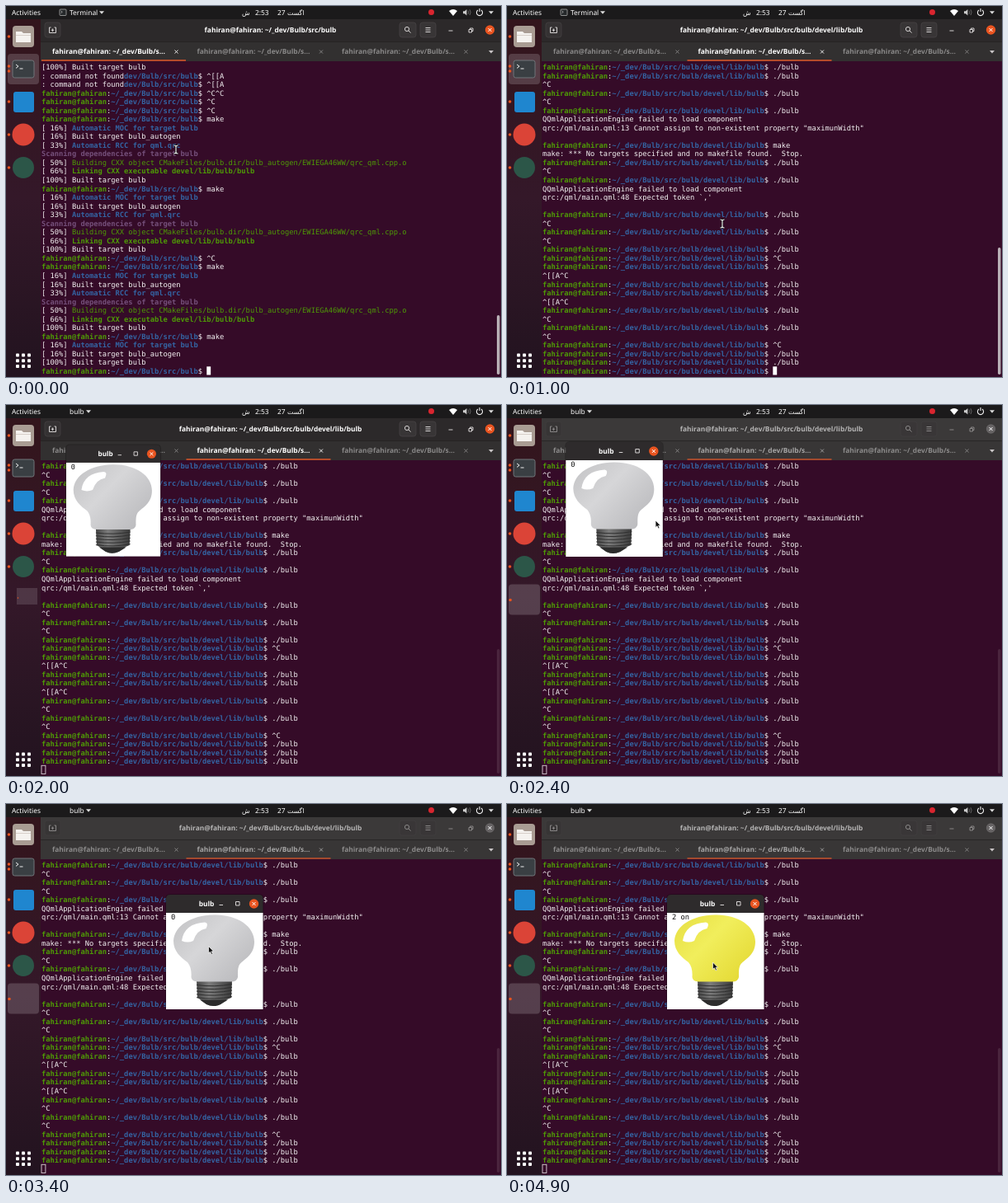
An HTML page for the animation above (5000 ms loop, 600 by 450 pixels).

```html
<!DOCTYPE html>
<html lang="en">
<head>
<meta charset="utf-8">
<title>Bulb demo</title>
<style>
html, body { margin: 0; width: 100%; height: 100%; overflow: hidden; background: #000; }
svg { display: block; width: 100vw; height: 100vh; }
text { white-space: pre; text-rendering: geometricPrecision; font-family: 'Noto Sans', 'Open Sans', sans-serif; font-size: 8.4px; fill: #fff; }
.mono, .mono text { font-family: 'DejaVu Sans Mono', monospace; font-size: 8.754px; }
.arabic { font-family: 'DejaVu Sans', sans-serif; font-size: 7.8px; }
.bold { font-weight: 700; }
.mid { text-anchor: middle; }
.w { fill: #f4f2f3; }
.g, .b, .m, .l { font-weight: 700; }
.g, .n, .l { fill: #4e9a06; }
.b { fill: #3465a4; }
.m { fill: #75507b; }
.line { fill: none; stroke: #d5d2d2; stroke-width: 1; }
</style>
</head>
<body>
<svg id="stage" viewBox="0 0 600 450">
  <defs>
    <linearGradient id="dock" x1="0" y1="0" x2="0" y2="1">
      <stop offset="0" stop-color="#33151c"/>
      <stop offset=".5" stop-color="#341829"/>
      <stop offset="1" stop-color="#22131f"/>
    </linearGradient>
    <linearGradient id="off" x1="0" y1="0" x2="1" y2=".8">
      <stop offset="0" stop-color="#c2c2c4"/>
      <stop offset=".45" stop-color="#d6d6d8"/>
      <stop offset="1" stop-color="#bababd"/>
    </linearGradient>
    <linearGradient id="on" x1="0" y1="0" x2="1" y2=".8">
      <stop offset="0" stop-color="#e6de42"/>
      <stop offset=".45" stop-color="#f1ee5c"/>
      <stop offset="1" stop-color="#e4d934"/>
    </linearGradient>
    <linearGradient id="metal">
      <stop offset="0" stop-color="#454545"/>
      <stop offset=".35" stop-color="#7c7c7c"/>
      <stop offset="1" stop-color="#3a3a3a"/>
    </linearGradient>
    <clipPath id="view"><rect x="42" y="69" width="558" height="381"/></clipPath>
  </defs>

  <!-- terminal window -->
  <rect x="42" y="67" width="558" height="383" fill="#350b28"/>
  <rect id="head" x="42" y="16" width="558" height="27"/>
  <rect id="strip" x="42" y="43" width="558" height="24"/>
  <path d="M42 43.5H600" stroke="#1e1b1c" stroke-opacity=".6"/>
  <g id="chrome">
    <rect x="47" y="20" width="19" height="18" rx="3" fill="#353233" stroke="#454142" stroke-width=".8"/>
    <path class="line" d="M52.5 26v6.5h8V26h-2M52.5 26h2M56.5 27.5v3.5M54.8 29.2h3.4"/>
    <rect x="477" y="20" width="20" height="18" rx="3" fill="#383536" stroke="#474344" stroke-width=".8"/>
    <circle class="line" cx="486" cy="28" r="2.6"/><path class="line" d="M488 30l2.6 2.6"/>
    <rect x="502" y="20" width="19" height="18" rx="3" fill="#383536" stroke="#474344" stroke-width=".8"/>
    <path class="line" d="M508.5 26.5h6M508.5 29h6M508.5 31.5h6"/>
    <path class="line" d="M536.5 30h5M561 28.5h3.5V32H561zM562.5 28.5V27H566v3.5h-1.5"/>
  </g>
  <text id="title" class="bold mid" x="320.5" y="32"></text>
  <circle id="close" cx="586.5" cy="29" r="5.7"/>
  <path d="M584.5 27l4 4m0-4l-4 4" stroke="#fff" stroke-width="1"/>
  <g id="tabs"></g>
  <rect id="underline" y="65.2" width="175" height="1.5" fill="#e0552a"/>
  <path d="M585 54h6l-3 3.5z" fill="#c9c5c6"/>
  <g clip-path="url(#view)">
    <g id="screen0" class="mono"></g>
    <g id="screen1" class="mono"></g>
  </g>
  <rect id="caret" width="4.9" height="10.2"/>
  <rect id="thumb" x="595" width="3.5" rx="1.7"/>

  <!-- dock -->
  <rect y="16" width="42" height="434" fill="url(#dock)"/>
  <rect id="active" x="2" width="38" height="37" rx="4" fill="#fff" fill-opacity=".17"/>
  <rect id="appBox" x="13" y="222" width="25" height="20" fill="#fff" fill-opacity=".13"/>
  <rect x="8" y="24" width="26" height="26" rx="4" fill="#a99c93"/>
  <path d="M12 31h7l2 2h9v11H12z" fill="#f5f2ef"/>
  <path d="M12 35.5h18" stroke="#d6cec8"/>
  <rect x="8" y="66" width="26" height="21" rx="2.5" fill="#3a3f43" stroke="#70767a"/>
  <path d="M12 71l3 2.2-3 2.2M16.5 76h4" fill="none" stroke="#eee"/>
  <rect x="9" y="104" width="25" height="25" rx="3" fill="#1f86cf"/>
  <circle cx="21" cy="156" r="13.5" fill="#db4437"/>
  <circle cx="21" cy="196" r="13" fill="#2c5648"/>
  <g id="dots" fill="#e95420"></g>
  <g id="grid" fill="#fff"></g>

  <!-- top bar -->
  <rect width="600" height="16" fill="#1b1a1b"/>
  <text x="7" y="11">Activities</text>
  <g id="appIcon">
    <rect x="65" y="4" width="8" height="7.5" rx="1" fill="#25282a" stroke="#aaa" stroke-width=".8"/>
    <path d="M66.7 6l1.5 1.3-1.5 1.3" fill="none" stroke="#ddd" stroke-width=".7"/>
  </g>
  <text id="appName" x="77" y="11"></text>
  <path id="appArrow" d="M-3 6.2h6L0 9.8z" fill="#ddd"/>
  <text x="286" y="11" class="arabic">ش</text>
  <text x="302" y="11">2:53</text>
  <text x="329" y="11">27</text>
  <text x="341" y="11" class="arabic">اگست</text>
  <circle cx="515.5" cy="7.5" r="3.5" fill="#d9252f"/>
  <path d="M537 6q5-4 10 0L542 12z" fill="#fff"/>
  <path d="M554 6.2h2l2.4-2.2v7.4L556 9.2h-2z" fill="#ccc"/>
  <path d="M560 5.5q1.5 2.2 0 4.4M562 4.3q2.2 3.4 0 6.8" fill="none" stroke="#777" stroke-width=".8"/>
  <path d="M572 5a3.6 3.6 0 1 0 4 0M574 3v4" fill="none" stroke="#eee" stroke-width="1.1"/>
  <path d="M585 6.2h6L588 9.8z" fill="#ddd"/>

  <!-- bulb window, drawn from its top left corner -->
  <g id="win">
    <path d="M-1 139V5q0-6 6-6h107.5q6 0 6 6v134z" fill="#000" fill-opacity=".25"/>
    <path d="M0 22V5q0-5 5-5h107.5q5 0 5 5v17z" fill="#2e2b2c"/>
    <rect y="22" width="117.5" height="117" fill="#fff"/>
    <text class="bold mid" x="49" y="14">bulb</text>
    <path class="line" d="M64.5 12.5h4.5M84.5 8.5h4.5v4.5h-4.5z"/>
    <circle cx="106.5" cy="11" r="5.7" fill="#e95420"/>
    <path d="M104.5 9l4 4m0-4l-4 4" stroke="#fff"/>
    <path d="M37 104H80L79 125L74 127L66 133Q57 137 49 133L43 128L38 125Z" fill="url(#metal)"/>
    <path d="M41 127.5h34l-9 5.500q-9 4-17 0z" fill="#2c2c2c"/>
    <g id="screw" fill="none" stroke="#2f2f2f"></g>
    <path id="glass" d="M58 24.5C86 24 107 38 107 57C107 73 95 78 89.5 84C86.5 88 87 95 87 100Q86 105.5 79 105.5H38Q31 105 30.5 100C31 93 30 87 26 82C18 76 9 69 9 56C10 38 30 25 58 24.5Z"/>
    <path d="M19 56Q22 35 47 33.5Q52 34 48.5 41Q37 43 33 56Q26 59 19 56Z" fill="#fff"/>
    <text id="count" class="mono" x="6" y="30" style="fill:#111"></text>
  </g>

  <!-- pointers, each around its hot spot -->
  <g id="beam" fill="none">
    <path d="M-2.5-5q2 0 2.5 1.2q.5-1.2 2.5-1.2M0-4V4M-2.5 5q2 0 2.5-1.2q.5 1.2 2.5 1.2" stroke="#111" stroke-width="2.4"/>
    <path d="M-2.5-5q2 0 2.5 1.2q.5-1.2 2.5-1.2M0-4V4M-2.5 5q2 0 2.5-1.2q.5 1.2 2.5 1.2" stroke="#fff" stroke-width="1.1"/>
  </g>
  <path id="arrow" d="M0 0V8.5L2 6.8L3.5 10L5 9.3L3.6 6.3H6.2Z" fill="#111" stroke="#fff" stroke-width=".7"/>
  <path id="hand" d="M-3.5-1q0-1.5 1.3-1.2V-4q1-1 1.6 0q1-1.3 1.8 0q1-.9 1.6.3q1.3-.5 1.3 1V2L3 4.5H-1.5L-3.5 1.5Z" fill="#fff" stroke="#111" stroke-width=".7"/>
</svg>

<script>
const LOOP = 5000, STEP = 100, ROW = 10.54, COL = 5.27, LEFT = 43, BASE = 77;
const USER = 'fahiran@fahiran', SRC = '~/_dev/Bulb/src/bulb', LIB = SRC + '/devel/lib/bulb';
const $ = id => document.getElementById(id);
const set = (node, attrs) => { for (const k in attrs) node.setAttribute(k, attrs[k]); };
const show = (node, on) => node.setAttribute('display', on ? 'inline' : 'none');
const move = (node, x, y, s = 1) => node.setAttribute('transform', `translate(${x} ${y}) scale(${s})`);
const clamp = v => Math.max(0, Math.min(1, v));
const mix = (a, b, p) => a + (b - a) * p;
const ease = p => p * p * (3 - 2 * p);

function add(parent, tag, attrs, text) {
  const node = document.createElementNS('http://www.w3.org/2000/svg', tag);
  set(node, attrs);
  if (text) node.textContent = text;
  return parent.appendChild(node);
}

// A line of output is a list of [class, text] runs.
const prompt = (path, cmd) => [['g', USER], ['w', ':'], ['b', path], ['w', '$ ' + cmd]];
const step = (pct, cls, text) => [['w', `[${String(pct).padStart(3)}%] `], [cls, text]];
const cd = cmd => prompt(SRC, cmd);
const lost = [['w', ': command not found'], ['b', 'dev/Bulb/src/bulb'], ['w', '$ ^[[A']];
const done = step(100, 'w', 'Built target bulb');
const moc = [step(16, 'b', 'Automatic MOC for target bulb'), step(16, 'w', 'Built target bulb_autogen')];
const build = [cd('make'), ...moc,
  step(33, 'b', 'Automatic RCC for qml.qrc'),
  [['m', 'Scanning dependencies of target bulb']],
  step(50, 'n', 'Building CXX object CMakeFiles/bulb.dir/bulb_autogen/EWIEGA46WW/qrc_qml.cpp.o'),
  step(66, 'l', 'Linking CXX executable devel/lib/bulb/bulb'), done];
const buildLog = [done, lost, lost, cd('^C^C'), cd('^C'), cd('^C'),
  ...build, ...build, cd('^C'), ...build, cd('make'), ...moc, done, cd('')];

const failed = 'QQmlApplicationEngine failed to load component';
const runLog = ['>', '>', '^C', '>', '^C', '>', failed,
  'qrc:/qml/main.qml:13 Cannot assign to non-existent property "maximunWidth"', '',
  '>make', 'make: *** No targets specified and no makefile found.  Stop.', '>', '^C', '>', failed,
  "qrc:/qml/main.qml:48 Expected token `,'", '', '>', '^C', '>', '^C', '>', '>^C', '>', '^[[A^C',
  '>', '>', '^[[A^C', '>', '^C', '>', '^C', '>^C', '>', '>', '> ']
  .map(s => s[0] === '>' ? prompt(LIB, s === '> ' ? '' : s.slice(1) || './bulb') : [['w', s]]);

function printLog(group, log) {
  return log.map((runs, i) => {
    const row = add(group, 'text', { x: LEFT, y: BASE + i * ROW });
    runs.forEach(([cls, text]) => add(row, 'tspan', { class: cls }, text));
    return row;
  });
}
printLog($('screen0'), buildLog);
const lastRow = printLog($('screen1'), runLog).pop();

const tabs = [56, 231.5, 407].map(x => {
  const tab = add($('tabs'), 'g', {});
  add(tab, 'text', { x, y: 58, class: 'bold' }, USER + ': ~/_dev/Bulb/s…');
  add(tab, 'path', { d: `M${x + 148.5} 53.5l4 4m0-4l-4 4`, stroke: '#fff', 'stroke-width': .9 });
  return tab;
});
[37, 73, 79, 116, 156, 196].forEach(cy => add($('dots'), 'circle', { cx: 3.5, cy, r: 1.8 }));
const appDot = add($('dots'), 'circle', {});
for (let i = 0; i < 9; i++)
  add($('grid'), 'rect', { x: 12 + i % 3 * 7, y: 421.5 + Math.floor(i / 3) * 6.8, width: 4, height: 4, rx: 1 });
for (let i = 0; i < 5; i++)
  add($('screw'), 'path', { d: `M37 ${109.5 + i * 3.8}q22 3 43-1` });

// Pointer stops: time, x, y, shape used until the next stop.
const stops = [
  [0, 206, 174, 'beam'], [200, 245, 110, 'beam'], [400, 285, 55, 'arrow'], [600, 283, 58, 'arrow'],
  [700, 275, 110, 'beam'], [1000, 261, 264, 'beam'], [1300, 261, 264, ''], [2200, 261, 264, 'beam'],
  [2400, 180, 140, 'arrow'], [2700, 110, 57, 'arrow'], [2900, 107, 57, 'hand'], [3300, 230, 122, 'arrow'],
  [3400, 245.5, 172.5, 'arrow'], [4000, 249, 192, 'arrow'], [LOOP, 249.5, 192, 'arrow']];

function drawPointer(t, drag) {
  const i = stops.findIndex((s, k) => t < stops[k + 1][0]);
  const [t0, x0, y0, shape] = stops[i], [t1, x1, y1] = stops[i + 1];
  const p = shape === 'hand' ? drag : (t - t0) / (t1 - t0);
  for (const id of ['beam', 'arrow', 'hand']) show($(id), id === shape);
  if (shape) move($(shape), mix(x0, x1, p), mix(y0, y1, p));
}

function drawTerminal(t) {
  const tab = t < 500 ? 0 : 1, ran = t >= 1500, typed = t >= 1300;
  const focused = t < 1900, framed = t < 2100;
  $('title').textContent = USER + ': ' + (tab ? LIB : SRC);
  $('title').setAttribute('opacity', framed ? 1 : .62);
  $('chrome').setAttribute('opacity', framed ? 1 : .5);
  $('head').setAttribute('fill', framed ? '#2c292a' : '#3b3939');
  $('strip').setAttribute('fill', framed ? '#323030' : '#383636');
  $('close').setAttribute('fill', framed ? '#e95420' : '#666364');
  tabs.forEach((g, i) => g.setAttribute('opacity', i === tab ? framed ? 1 : .55 : .42));
  set($('underline'), { x: tab ? 218.5 : 43, opacity: framed ? 1 : .85 });
  show($('screen0'), !tab);
  show($('screen1'), tab);
  move($('screen1'), 0, ran ? -ROW : 0);
  lastRow.lastChild.textContent = typed ? '$ ./bulb' : '$ ';
  const col = ran ? 0 : tab ? 53 + (typed ? 6 : 0) : 38;
  set($('caret'), { x: LEFT + col * COL, y: 437.3, fill: focused ? '#fff' : 'none',
    stroke: focused ? 'none' : '#d8d0d5', 'stroke-width': .9 });
  const top = tab ? ran ? 296 : 293 : 375;
  set($('thumb'), { y: top, height: 447 - top, fill: focused ? '#b9b0b6' : '#4a243d' });
}

function drawShell(t) {
  const open = t >= 1900, settled = t >= 2100;
  show($('appIcon'), !open);
  $('appName').textContent = open ? 'bulb' : 'Terminal';
  move($('appArrow'), open ? 100 : 116, 0);
  show($('active'), !open || settled);
  $('active').setAttribute('y', open ? 217.5 : 58);
  show($('appBox'), open && !settled);
  show(appDot, open);
  set(appDot, settled ? { cx: 4, cy: 236.5, r: 1.8 } : { cx: 14.5, cy: 234, r: .8 });
}

function drawBulb(t, drag) {
  const grow = clamp((t - 1850) / 175), s = .8 + .2 * grow;
  const lit = t >= 3800 && t < 4400 || t >= 4800;
  show($('win'), t >= 1900);
  $('win').setAttribute('opacity', clamp(grow * 1.2));
  move($('win'), mix(71.3, 194, drag) + 58.7 * (1 - s), mix(45, 110, drag) + 125 * (1 - s), s);
  $('glass').setAttribute('fill', `url(#${lit ? 'on' : 'off'})`);
  $('count').textContent = t < 3800 ? '0' : t < 4400 ? '1 on' : t < 4800 ? '1 off' : '2 on';
}

function draw(time) {
  const t = Math.floor(((time + 10) % LOOP) / STEP) * STEP;
  const drag = ease(clamp((t - 2900) / 400));
  drawTerminal(t);
  drawShell(t);
  drawBulb(t, drag);
  drawPointer(t, drag);
}

const start = performance.now();
function tick() {
  draw(performance.now() - start);
  requestAnimationFrame(tick);
}
tick();
</script>
</body>
</html>
```
